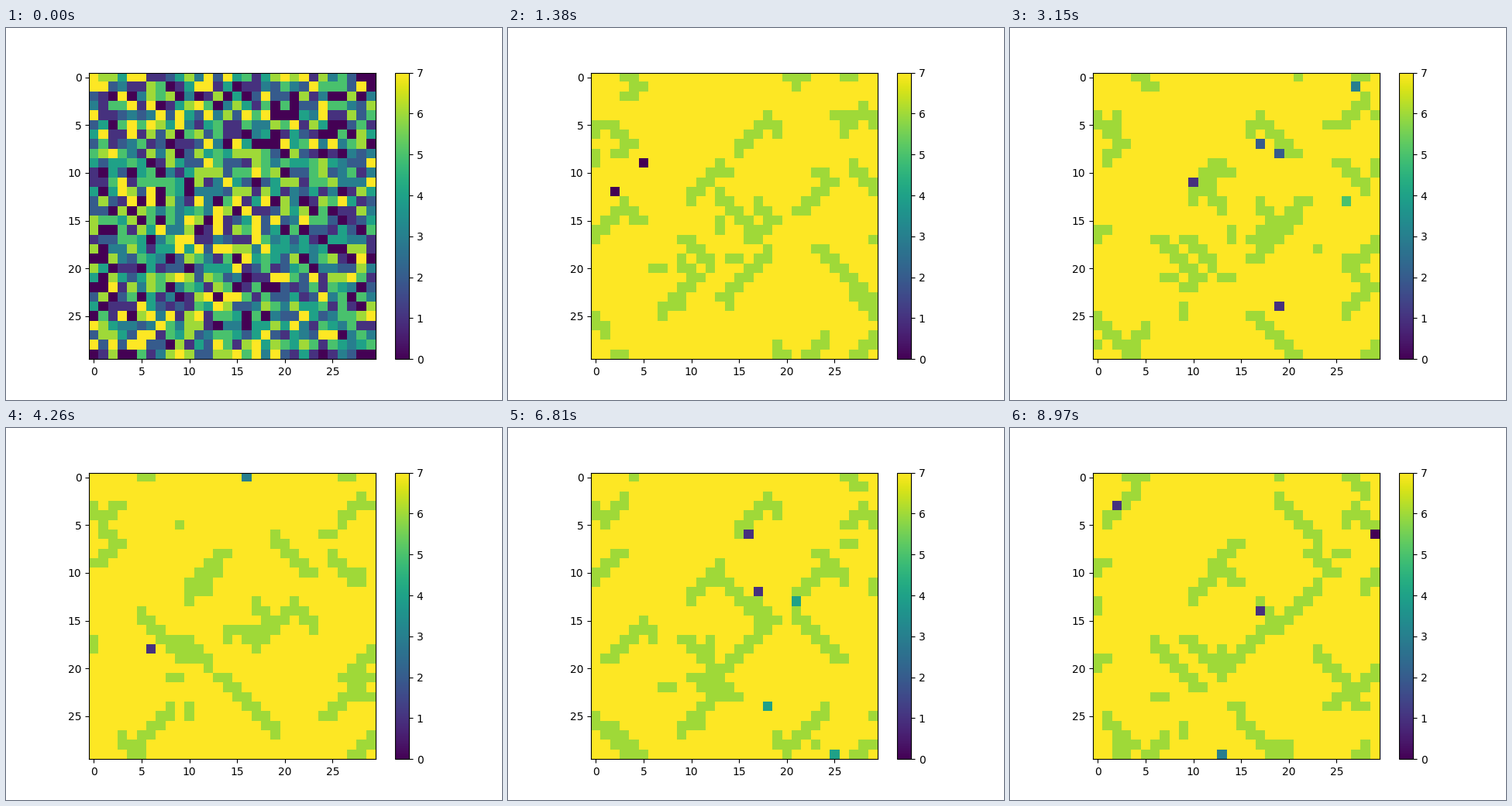
A matplotlib script for the animation above (9000 ms loop, 640 by 480 pixels).

```python
import numpy as np
import matplotlib.pyplot as plt
from matplotlib.animation import FuncAnimation

SIZE, TOP, FRAMES = 30, 7, 300
rng = np.random.default_rng(11)
rows, cols = np.mgrid[:SIZE, :SIZE]

# Diamond rings: centre column, centre row, radius
RINGS = [(18, 10, 6), (20, 22, 7), (4, 22, 7), (0, 0, 4), (28, 7, 4), (13, 14, 5)]
phase = rng.uniform(0, 2 * np.pi, len(RINGS))
drift = rng.uniform(-0.02, 0.02, len(RINGS))
specks = rng.integers(0, SIZE, (6, 2))


def wrap(delta):
    """Shortest signed distance on the wrapped grid."""
    return (delta + SIZE // 2) % SIZE - SIZE // 2


def ridge_field(n):
    """Full grid with broken diamond rings and short pairs one level lower."""
    low = np.zeros((SIZE, SIZE), bool)
    for (col, row, radius), p, w in zip(RINGS, phase, drift):
        # Rings sway by one cell while their gaps creep around them
        dx = wrap(cols - col - round(np.sin(p + w * n)))
        dy = wrap(rows - row - round(np.cos(2 * p + w * n)))
        gap = abs(dx) + abs(dy) - radius
        open_arc = np.cos(3 * np.arctan2(dy, dx) + p + 2 * w * n) < -0.25
        low |= ((gap == 0) | (gap == 1)) & ~open_arc
    for i, (x, y) in enumerate(specks):
        y = (y + n // (50 + 9 * i)) % SIZE
        x = (x + round(np.sin(i + n / 40))) % SIZE
        low[y, x] = True
        if i % 2:
            low[(y + 1) % SIZE, x] = True
        else:
            low[y, (x + 1) % SIZE] = True
    return TOP - low.astype(int)


def simulate():
    """Every cell climbs back one level per step; a few drop to zero."""
    grid = rng.integers(0, TOP + 1, (SIZE, SIZE))
    states = [grid]
    for n in range(1, FRAMES):
        grid = np.minimum(grid + 1, ridge_field(n))
        drops = rng.integers(0, SIZE, (rng.poisson(1.2), 2))
        grid[drops[:, 0], drops[:, 1]] = 0
        states.append(grid)
    return states


states = simulate()

fig, ax = plt.subplots(figsize=(6.4, 4.8), dpi=100)
image = ax.imshow(states[0], cmap="viridis", vmin=0, vmax=TOP)
fig.colorbar(image, ax=ax)


def update(n):
    image.set_data(states[n])
    return [image]


anim = FuncAnimation(fig, update, frames=FRAMES, interval=30,
                     repeat=True, repeat_delay=0, blit=False)
plt.show()
```
